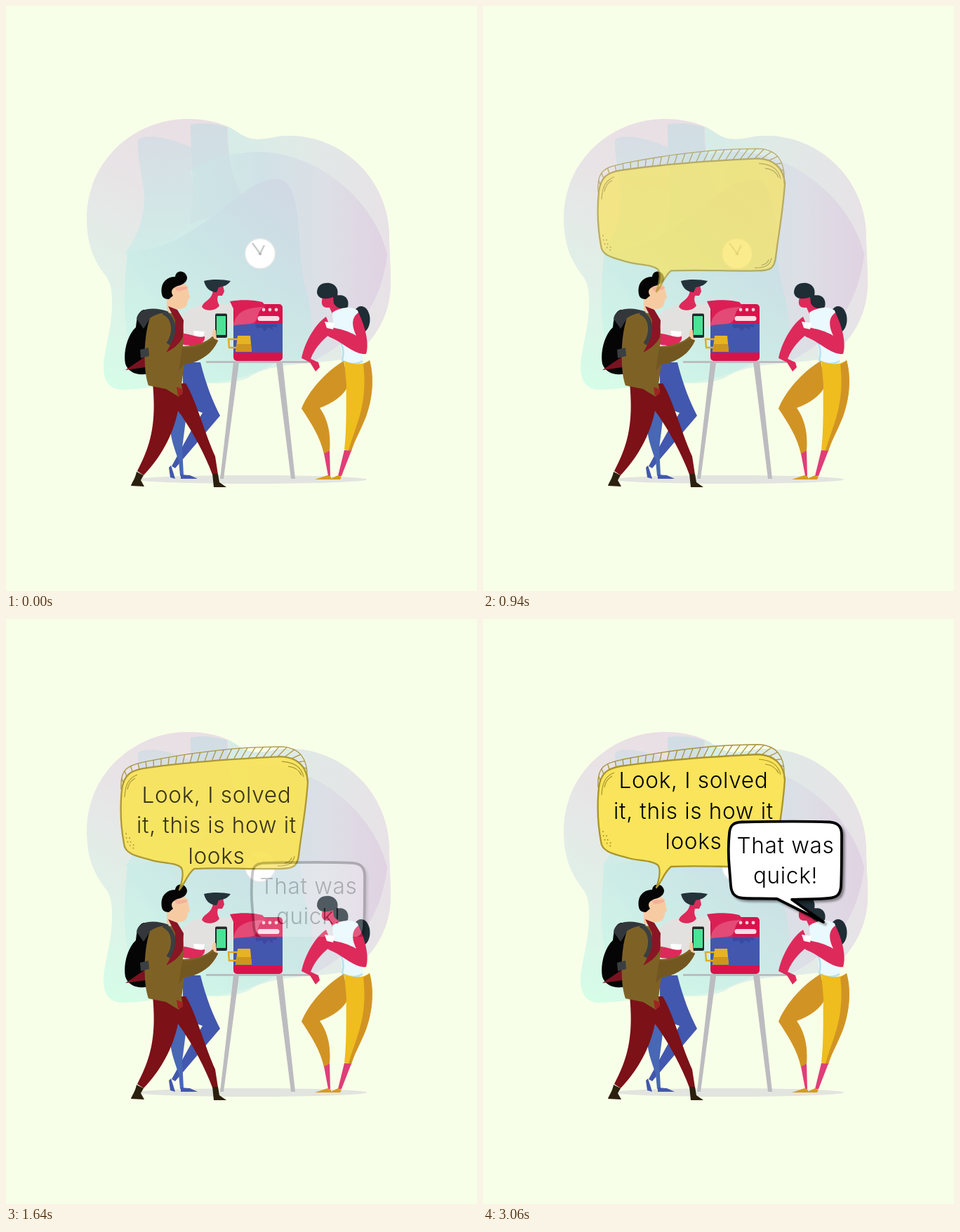
An HTML page for the animation above (8 s loop, 671 px wide and 834 px high).

```html
<!DOCTYPE html>
<html lang="en">
<head>
<meta charset="utf-8">
<title>Coffee corner chat</title>
<style>
html, body { margin: 0; width: 100%; height: 100%; overflow: hidden; background: #f8ffe8; }
svg { display: block; width: 671px; height: 834px; }
text { font: 350 31.5px Inter, "Open Sans", sans-serif; letter-spacing: .7px; text-anchor: middle; }
.rise { opacity: 0; }
</style>
</head>
<body>
<svg viewBox="0 0 671 834">
<defs>
  <linearGradient id="base" gradientUnits="userSpaceOnUse" x1="150" y1="540" x2="330" y2="200">
    <stop stop-color="#d5fde8"/><stop offset=".35" stop-color="#e0f0e8"/><stop offset=".7" stop-color="#e8e4e6"/><stop offset="1" stop-color="#e9dfe4"/>
  </linearGradient>
  <linearGradient id="lobe" gradientUnits="userSpaceOnUse" x1="320" y1="0" x2="548" y2="0">
    <stop stop-color="#d6ece7"/><stop offset=".4" stop-color="#dfeae6"/><stop offset="1" stop-color="#e8e2e7"/>
  </linearGradient>
  <linearGradient id="dome" gradientUnits="userSpaceOnUse" x1="190" y1="0" x2="545" y2="0">
    <stop stop-color="#d2f2ea"/><stop offset=".5" stop-color="#cfe0e6"/><stop offset=".75" stop-color="#dcdde6"/><stop offset="1" stop-color="#dfcfe1"/>
  </linearGradient>
  <linearGradient id="hill" gradientUnits="userSpaceOnUse" x1="390" y1="250" x2="210" y2="530">
    <stop stop-color="#d0d7e4"/><stop offset=".35" stop-color="#c9e2e5"/><stop offset="1" stop-color="#cdf8e8"/>
  </linearGradient>
  <linearGradient id="tab" x2="0" y2="1"><stop stop-color="#d8dbe4"/><stop offset="1" stop-color="#d0ece8"/></linearGradient>
  <clipPath id="stageClip"><path d="M0 0H671V453H0Z"/></clipPath>
</defs>

<g id="backdrop">
  <path fill="url(#base)" d="M115 302C115 225 178 161 260 161C282 161 300 165 316 172C331 179 340 190 358 190C375 190 385 185 403 185C482 185 546 250 546 330C546 350 548 370 548 395C548 440 525 480 490 502C440 512 380 506 345 530C320 541 290 538 262 536C220 540 200 547 165 547C145 546 138 532 139 510C141 485 152 455 151 420C151 405 149 395 143 386C125 363 115 340 115 302Z"/>
  <path fill="url(#lobe)" d="M316 172C331 179 340 190 358 190C375 190 385 185 403 185C482 185 546 250 546 330C546 350 548 370 548 395C548 440 525 480 490 502L430 400L345 285C325 255 316 225 316 172Z"/>
  <path fill="url(#tab)" d="M188 191C200 180 240 190 264 202L263 169C280 166 300 168 315 173C316 225 325 255 345 285L300 345L170 352C190 325 197 300 197 270C194 240 187 215 188 191Z"/>
  <path fill="url(#dome)" opacity=".85" d="M262 236C290 215 330 208 365 208C450 212 525 280 543 354C536 420 500 475 440 505L260 505L170 352C215 350 240 335 262 310C272 285 270 260 262 236Z"/>
  <path fill="#cbdfe4" opacity=".5" d="M263 169C280 166 300 168 315 173C316 225 325 255 345 285L262 310C272 260 262 220 263 169Z"/>
  <path fill="url(#hill)" opacity=".85" d="M173 351C240 349 290 303 340 265C365 246 385 244 395 249C423 266 414 345 425 395C435 430 442 470 430 505L390 506C350 528 310 540 262 536L200 520C160 490 168 400 173 351Z"/>
</g>

<g id="clock" stroke="#c9cbcb" stroke-width="2">
  <circle cx="362" cy="353" r="21.5" fill="#fff" stroke="#e2e6e4" stroke-width="1.5"/>
  <path fill="none" stroke-width="2.4" d="M351 338L362 353L368 341"/>
  <circle cx="362" cy="353" r="1.5"/>
</g>

<ellipse cx="350" cy="675" rx="164" ry="6" fill="#e2e4df"/>

<g id="colleague">
  <path fill="#e3e1df" d="M250 442C262 428 280 424 300 425L326 426L326 455C312 462 302 464 296 484L252 486Z"/>
  <path fill="#dd2a5b" d="M296 399L309 398L311 407L308 413L302 413C300 419 302 423 304 427C300 434 285 437 279 429C281 421 291 420 294 410Z"/>
  <path fill="#24323a" d="M282 392C295 389 310 390 320 392C316 398 310 400 303 401L300 408C290 408 284 401 282 392Z"/>
  <path fill="#fff" d="M267 463L283 464L280 476L269 475Z"/>
  <path fill="#dd2a5b" d="M250 467C260 466 272 474 283 471C285 481 270 488 250 482Z"/>
  <path fill="#4257ae" d="M252 508L277 508C285 540 295 565 305 584L241 659L236 656L264 605L280 580L252 570Z"/>
  <path fill="#4867b5" d="M243 566C231 598 231 608 246 648L248 670L253 669L251 630L260 560Z"/>
  <path fill="#4257ae" d="M235 655L232 658L234 672L241 674L238 664ZM249 668L262 669L273 674L249 674Z"/>
</g>

<g id="table" fill="#bcbcc0">
  <path d="M324 508H332L310 674H305ZM385 508H394L412 674H406Z"/>
  <path d="M285 506H440V509H285Z"/>
</g>

<g id="machine">
  <rect x="324" y="425" width="70" height="81" rx="5" fill="#d8134c"/>
  <path fill="#4457ae" d="M324 453H394V494H324Z"/>
  <path fill="#3a4a9d" d="M355 454H386V458L380 457V462L374 458L368 464L364 458L357 460Z"/>
  <path fill="#db1f55" d="M319 421C335 418 355 419 365 422L371 428L360 432L356 453H324L326 436Z"/>
  <path fill="#e34a76" d="M324 456C327 438 338 430 368 429C356 434 362 447 352 452C342 455 332 453 324 456Z"/>
  <path fill="#f9dce4" d="M362 442H386A3.5 3.5 0 0 1 386 449H362A3.5 3.5 0 0 1 362 442Z"/>
  <g fill="#f7cdd9"><circle cx="367" cy="433" r="2.4"/><circle cx="376" cy="433" r="2.4"/><circle cx="385" cy="433" r="2.4"/></g>
  <path fill="none" stroke="#e0ac24" stroke-width="2.5" d="M330 475H317L318 487H329"/>
  <path fill="#e6b422" d="M330 470H348L350 493H327Z"/>
  <path fill="#cf951d" d="M329 482H349L350 493H327Z"/>
</g>

<g id="woman">
  <ellipse cx="506" cy="447" rx="12.5" ry="19" fill="#1f2d35"/>
  <path fill="#dd2a5b" d="M452 412C448 424 449 431 461 430L466 441L482 436L474 412Z"/>
  <path fill="#1f2d35" d="M443 409C443 398 451 394 461 395C471 397 474 405 472 413C481 410 490 417 487 429C480 434 471 431 467 424L466 415C455 419 445 418 443 409Z"/>
  <path fill="#dd2a5b" d="M456 443C441 453 426 478 421 502L433 508L441 521L447 515L445 508L434 503C441 485 453 474 465 465Z"/>
  <path fill="#e9f9fd" d="M465 437C475 430 492 427 501 434C507 450 506 480 509 506C498 514 484 512 478 505C481 485 470 468 466 455Z"/>
  <path fill="none" stroke="#b5e0ee" stroke-width="2.5" d="M470 472C482 482 482 494 479 505C487 511 499 512 508 506"/>
  <path fill="#dd2a5b" d="M502 437C511 455 518 480 513 496C497 498 478 478 461 472C455 469 455 461 462 458C476 460 489 464 499 470C494 460 490 446 502 437Z"/>
  <path fill="#fff" d="M454 450L468 452L466 461L457 459Z"/>
  <path fill="#d19424" d="M481 506C450 525 428 555 421 574C435 595 448 615 453 639L461 634C463 610 459 590 447 573C466 566 482 555 488 540Z"/>
  <path fill="#efbd1d" d="M482 506C497 513 510 511 518 505C525 530 522 560 513 585C503 610 496 620 492 635L482 632C486 600 484 560 485 540Z"/>
  <path fill="#d19424" d="M509 511L518 505C525 530 522 560 513 585C503 610 496 620 492 635L488 634C497 600 516 570 509 511Z"/>
  <path fill="#df3e78" d="M453 638L461 634L462 670H459ZM482 633L492 634L478 670H473Z"/>
  <path fill="#d89b1f" d="M458 669L463 671V675H440ZM473 669L478 671L476 675H460Z"/>
</g>

<g id="man">
  <path fill="#050506" d="M212 433L196 433C187 436 186 448 185 458C172 470 167 495 170 510C174 523 190 528 202 524L214 450Z"/>
  <path fill="#33373b" d="M186 446C188 430 212 428 232 436L224 444L205 446L196 460Z"/>
  <path fill="#7c1118" d="M209 538L256 538C270 560 284 612 298 642L302 668H294C288 650 268 608 245 577C238 612 220 644 196 669L187 663C204 630 215 600 209 538Z"/>
  <path fill="#2b200d" d="M186 664L196 669L192 676L197 685L178 684C180 678 184 674 186 664ZM294 667H302L304 679L314 686H296Z"/>
  <path fill="#f7cba2" d="M231 401C243 394 256 392 259 402L262 416L259 419C259 430 252 433 243 432L241 438L229 434L229 415Z"/>
  <path fill="#f6b199" d="M240 401L259 400L257 404L244 407Z"/>
  <path fill="#050506" d="M222 411C219 396 228 386 241 386C242 376 256 376 258 387C258 395 250 398 245 399C236 402 234 407 238 413L232 418C225 418 223 415 222 411Z"/>
  <path fill="#f7cba2" d="M294 474C293 466 294 461 298 460L302 472L299 480Z"/>
  <path fill="#7a1220" d="M170 519L198 500L206 514Z"/>
  <path fill="#7e6225" d="M205 445C215 437 240 432 248 446C256 460 252 474 252 485C268 485 285 480 294 471L302 477C293 497 275 508 254 511L250 540L252 550L246 557L228 546L203 541C195 520 196 470 205 445Z"/>
  <path fill="#735720" d="M251 487C266 490 285 480 297 474L302 477C293 497 275 508 254 511L246 520Z"/>
  <path fill="#8a1524" d="M231 428L244 433L253 448L252 472C247 482 238 489 228 494C236 482 240 470 241 448Z"/>
  <path fill="none" stroke="#3a3f41" stroke-width="6" d="M224 437C242 444 241 468 231 482"/>
  <path fill="#3a3f41" d="M191 490L203 487L204 499L192 502Z"/>
  <path fill="#a12222" d="M243 543L251 546L252 553L245 556Z"/>
  <rect x="298" y="438.5" width="17" height="34.5" rx="2" fill="#20282b"/>
  <path fill="#4be396" d="M300 442H313V469H300Z"/>
  <path fill="#f7cba2" d="M295 461L299 462L300 476L296 474Z"/>
</g>

<g class="rise" data-start="500" data-fade="370">
  <path fill="#f9e45b" stroke="#aa942b" stroke-width="2.3" stroke-linejoin="round" d="M165 240C168 219 178 213 195 210C255 201 330 196 392 193C415 194 428 207 430 228C428 265 421 300 417 334C415 350 409 353 390 353C350 354 310 351 268 353C257 362 256 373 247 383C252 368 253 358 250 352C244 344 222 345 208 341C186 335 169 332 168 317C163 290 163 260 165 240Z"/>
  <g id="band" fill="none" stroke="#a8923a" stroke-width="1.3">
    <path id="inner" stroke="none" d="M164 240C168 219 178 213 195 210C255 201 330 196 392 193C415 194 428 207 430 228"/>
    <path id="outer" d="M164 240C162 208 175 206 200 200C260 188 330 179 392 179C418 180 431 195 429 228"/>
  </g>
  <path fill="none" stroke="#aa942b" stroke-width="1.2" d="M169 251C170 232 175 224 187 219M173 240C175 230 179 227 184 224M393 200C411 201 421 208 424 222M402 207C413 208 418 213 421 220M387 349C401 349 409 346 411 335M397 345C403 344 406 341 407 337"/>
  <path fill="none" stroke="#aa942b" stroke-width="1.5" stroke-dasharray="2 4" d="M171 302C171 313 175 321 184 325M176 308C176 314 179 318 183 320"/>
</g>
<g class="rise" data-start="1052" data-fade="340">
  <text x="300" y="241">Look, I solved</text>
  <text x="300" y="284.5">it, this is how it</text>
  <text x="300" y="328">looks</text>
</g>
<g clip-path="url(#stageClip)">
  <g class="rise" data-start="1533" data-fade="100">
    <path style="filter:drop-shadow(3px 3px 1.5px #0006)" fill="#fff" stroke="#000" stroke-width="3.8" stroke-linejoin="round" d="M351 355C349 335 350 315 351 305C352 294 357 290 368 289.500C410 288.500 460 288 494 289.500C506 290.500 511 296 511 308C511 335 511 360 510 381C509 393 504 397 493 398C475 400 460 399 440 400L485 432L419 399C400 398 385 399 371 398C358 397 354 391 353 380Z"/>
    <text x="431" y="333.5">That was</text>
    <text x="431" y="377">quick!</text>
  </g>
</g>
</svg>
<script>
const LOOP = 8000;
const STEPS = [0, 500, 520, 660, 780, 800, 940, 1060, 1200, 1220, 1360, 1480, 1620, 1640, 1780,
  2040, 2060, 2200, 2220, 2360, 2460, 2600, 2620, 2760, 2880, 2900, 3060];
const RISE = 61, DURATION = 1674, HATCHES = 29;
const risers = [...document.querySelectorAll('.rise')];

// Hatching between the bubble's top edge and its outer rim
const band = document.getElementById('band');
const [inner, outer] = ['inner', 'outer'].map(id => document.getElementById(id));
const along = (path, f) => path.getPointAtLength(path.getTotalLength() * Math.min(f, 1));
for (let i = 1; i < HATCHES; i++) {
  const a = along(inner, i / HATCHES), b = along(outer, i / HATCHES + .015);
  const line = document.createElementNS('http://www.w3.org/2000/svg', 'path');
  line.setAttribute('d', `M${a.x} ${a.y}L${b.x} ${b.y}`);
  band.append(line);
}

// The pace slows after 1360 ms and more than doubles after 2040 ms
function pace(t) {
  if (t < 1360) return t;
  if (t < 2040) return 1360 + (t - 1360) * .707;
  if (t < 2360) return 1841 + (t - 2040) * 2.216;
  return 2550 + t - 2360;
}

function draw(now) {
  const t = now % LOOP;
  const clock = pace(STEPS.findLast(step => step <= t));
  for (const el of risers) {
    const age = Math.max(0, clock - el.dataset.start);
    const left = Math.max(0, 1 - age / DURATION);
    el.setAttribute('transform', `translate(0 ${RISE * left ** 3})`);
    el.style.opacity = left ? 1 - Math.exp(-age / el.dataset.fade) : 1;
  }
  requestAnimationFrame(draw);
}
draw(performance.now());
</script>
</body>
</html>
```
